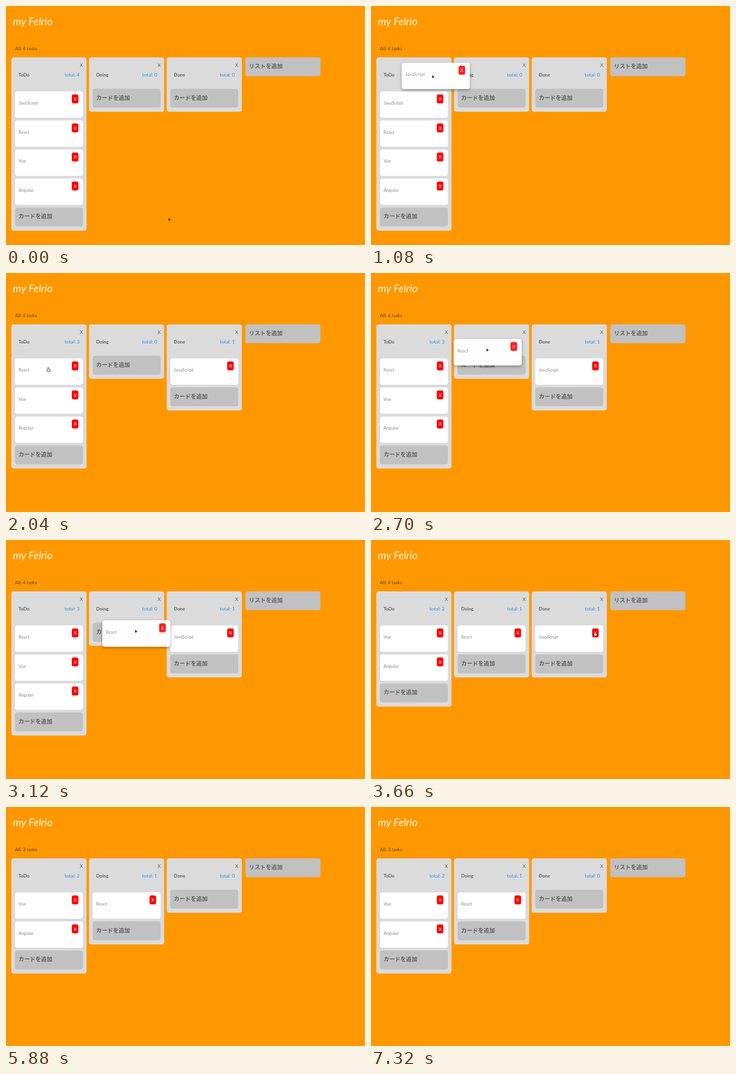
An HTML page with a canvas that plays this animation: 600x400 px, repeating every 7.38 s.

```html
<!DOCTYPE html>
<html lang="ja">
<head>
<meta charset="utf-8">
<title>Task board</title>
<style>
html, body { margin: 0; width: 100%; height: 100%; overflow: hidden; background: #ff9800; }
canvas { display: block; width: 600px; height: 400px; }
</style>
</head>
<body>
<canvas width="600" height="400"></canvas>
<script>
const ctx = document.querySelector('canvas').getContext('2d');
const LOOP = 7380, STEP = 60;
const ORANGE = '#ff9800', PANEL = '#dbdbdb', BUTTON = '#c1c1c1', INK = '#5f5f5f';
const LATIN = 'Lato, "Noto Sans CJK JP", sans-serif';
const JAPANESE = '"Noto Sans CJK JP", "Noto Sans CJK", sans-serif';
const TASKS = ['JavaScript', 'React', 'Vue', 'Angular'];

// Board layout
const LEFT = 9, TOP = 86, PITCH = 129.8, COLUMN_W = 125.5;
const PAD = 6, CARD_W = COLUMN_W - 2 * PAD, CARD_H = 44, CARD_TOP = 143, ROW = 48.6;
const columnX = i => LEFT + PITCH * i;
const cardY = i => CARD_TOP + ROW * i;

// Places where the pointer rests; lift bends the way to the next one upwards
const STOPS = [
  { from: 0, to: 120, x: 272, y: 354.5 },
  { from: 720, to: 900, x: 66, y: 163.5, drag: 'JavaScript', lift: 87 },
  { from: 1620, to: 1740, x: 299, y: 150 },
  { from: 2040, to: 2340, x: 70, y: 158.5, drag: 'React', lift: 48 },
  { from: 2820, to: 3240, x: 216, y: 150 },
  { from: 3600, to: 4020, x: 374, y: 154 },
  { from: 4500, to: 4860, x: 364, y: 38 },
  { from: 5200, to: LOOP, x: 368, y: -12 }
];
const DROPS = { JavaScript: 1680, React: 3180 };
const REMOVE = 4680;

const clamp = v => Math.max(0, Math.min(1, v));
const smooth = u => u * u * (3 - 2 * u);
const mix = (a, b, u) => a + (b - a) * u;

function pointerAt(t) {
  const i = STOPS.findLastIndex(s => t >= s.from);
  const a = STOPS[i], b = STOPS[i + 1] || a;
  const e = smooth(clamp((t - a.to) / (b.from - a.to)));
  return {
    x: mix(a.x, b.x, e),
    y: mix(a.y, b.y, e) - 4 * e * (1 - e) * (a.lift || 0)
  };
}

function listsAt(t) {
  const first = t >= DROPS.JavaScript, second = t >= DROPS.React;
  return {
    ToDo: TASKS.slice(first + second),
    Doing: second ? ['React'] : [],
    Done: first && t < REMOVE ? ['JavaScript'] : []
  };
}

function box(x, y, w, h, r, fill) {
  ctx.fillStyle = fill;
  ctx.beginPath();
  ctx.roundRect(x, y, w, h, r);
  ctx.fill();
}

function shape(points, fill) {
  ctx.fillStyle = fill;
  ctx.beginPath();
  points.forEach(p => ctx.lineTo(...p));
  ctx.fill();
}

function text(str, x, y, size, fill, { style = '', family = LATIN, align = 'left' } = {}) {
  ctx.font = `${style} ${size}px ${family}`;
  ctx.textAlign = align;
  ctx.fillStyle = fill;
  ctx.fillText(str, x, y);
}

function addButton(label, x, y, w) {
  box(x, y, w, 31.5, 4, BUTTON);
  text(label, x + PAD, y + 18, 9.4, INK, { style: 'bold', family: JAPANESE });
}

function card(name, x, y) {
  box(x, y, CARD_W, CARD_H, 4, '#fff');
  text(name, x + PAD, y + 22, 7.4, '#888');
  box(x + 95, y + 5, 11, 15, 3, '#f00');
  text('x', x + 100.5, y + 15.2, 9.5, '#fff', { align: 'center' });
}

function column(title, tasks, x) {
  const n = tasks.length, addY = n ? cardY(n) : 138.5, right = x + 114;
  box(x, TOP, COLUMN_W, addY + 38.5 - TOP, 4, PANEL);
  text('X', x + 117, 101.7, 8.2, INK, { align: 'center' });
  text(title, x + 12, 118, 7.7, INK, { style: 'bold' });
  text('total: ' + n, right, 118, 8.2, '#2e90e8', { align: 'right' });
  tasks.forEach((name, i) => card(name, x + PAD, cardY(i)));
  addButton('カードを追加', x + PAD, addY, CARD_W);
}

// The carried card keeps its place relative to the pointer
function carried({ drag, x, y }, p) {
  const left = LEFT + PAD + p.x - x, top = CARD_TOP + p.y - y;
  ctx.save();
  ctx.globalAlpha = 0.88;
  ctx.shadowColor = '#0006';
  ctx.shadowBlur = 5;
  ctx.shadowOffsetY = 2;
  box(left, top, CARD_W, CARD_H, 4, '#fff');
  ctx.shadowColor = 'transparent';
  card(drag, left, top);
  ctx.restore();
}

function dialog(t) {
  const show = Math.min(clamp((t - 4000) / 120), clamp((4820 - t) / 200));
  if (!show) return;
  const lean = 2 * (1 - show);
  const frame = [[231.5, -1], [368.5, -1], [369 + lean, 44], [231 - lean, 44]];
  ctx.save();
  ctx.shadowColor = `rgba(0, 0, 0, ${0.3 * show})`;
  ctx.shadowBlur = 3;
  shape(frame, '#ececec');
  ctx.shadowColor = 'transparent';
  text('localhost:8080 の内容', 237, 7.5, 4.7, '#111', { style: 'bold' });
  text('本当にこのカードを削除しますか？', 237, 17.5, 3.65, '#111', { family: JAPANESE });
  text('キャンセル', 312, 33, 3.6, '#111', { family: JAPANESE });
  box(337, 26, 27.5, 12, 1, '#007ae1');
  text('OK', 350.5, 33.5, 4, '#fff', { align: 'center' });
  // Fade the whole dialog into the background
  ctx.globalAlpha = 1 - show;
  shape(frame, ORANGE);
  ctx.restore();
}

function drawPointer({ x, y }, hand) {
  if (hand) {
    box(x - 0.8, y - 0.8, 2.6, 6, 1.2, '#444');
    box(x - 1.8, y + 2, 6, 5, 2, '#444');
    box(x, y, 1, 5, 0.5, '#fff');
    box(x - 0.8, y + 3, 4, 3, 1, '#fff');
  } else {
    shape([[x, y], [x, y + 5.5], [x + 1.4, y + 4.2], [x + 3.6, y + 4]], '#111');
  }
}

function draw(t) {
  const lists = listsAt(t), all = Object.values(lists);
  const p = pointerAt(t);
  ctx.fillStyle = ORANGE;
  ctx.fillRect(0, 0, 600, 400);
  text('my Felrio', 11.5, 31.5, 17.6, '#fffbe0', { style: 'italic' });
  text(`All: ${all.flat().length} tasks`, 15, 73.5, 7.9, '#5a4a28');

  Object.entries(lists).forEach(([title, tasks], i) => column(title, tasks, columnX(i)));
  addButton('リストを追加', 400, TOP, COLUMN_W);

  const grab = STOPS.find(s => s.drag && t >= s.to && t < DROPS[s.drag]);
  if (grab) carried(grab, p);
  dialog(t);

  const overCard = all.some((tasks, i) => tasks.some((_, row) => {
    const dx = p.x - columnX(i) - PAD, dy = p.y - cardY(row);
    return dx > 0 && dx < CARD_W && dy > 0 && dy < CARD_H;
  }));
  drawPointer(p, overCard && !grab);
}

const start = performance.now();
function tick() {
  const t = Math.max(0, performance.now() - start) % LOOP;
  draw(Math.floor(t / STEP) * STEP);
  requestAnimationFrame(tick);
}
tick();
</script>
</body>
</html>
```
